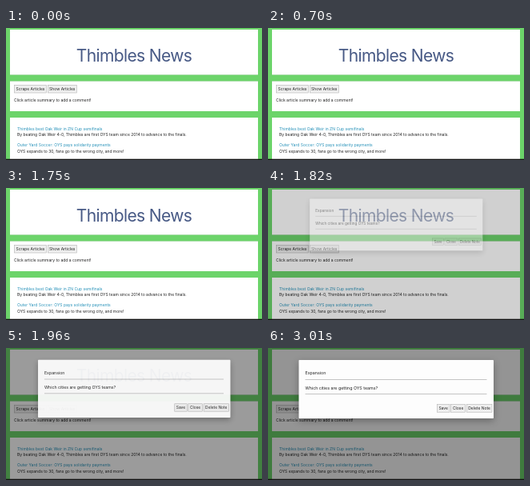
Animation of 320 by 165 pixels, one loop 3.5 s. Source, as an HTML page:

```html
<!DOCTYPE html>
<html lang="en">
<head>
<meta charset="utf-8">
<title>Thimbles News</title>
<style>
  html, body { margin: 0; width: 100%; height: 100%; overflow: hidden; background: #6cd46a; }
  svg { display: block; width: 100%; height: 100%; }
  text { font: 5px Inter, sans-serif; fill: #222; }
  .title { font-size: 21px; letter-spacing: -.03em; text-anchor: middle; fill: #475985; }
  .link { fill: #2590b8; }
  .panel { fill: #fff; filter: drop-shadow(0 .5px .5px rgba(0, 0, 0, .22)); }
  .button rect { fill: #efefef; stroke: #b4b4b4; stroke-width: .6; }
  .button text { text-anchor: middle; }
  .sheet { fill: #fdfdfd; filter: drop-shadow(0 3px 4px rgba(0, 0, 0, .3)); }
  .field { font-size: 5.3px; }
  .rule { stroke: #9e9e9e; stroke-width: .6; }
</style>
</head>
<body>
<svg viewBox="0 0 320 165" preserveAspectRatio="none">
  <rect width="320" height="165" fill="#6cd46a"/>
  <rect class="panel" x="5" y="2" width="310" height="56.5"/>
  <rect class="panel" x="5" y="66.5" width="310" height="37.5"/>
  <rect class="panel" x="5" y="112" width="310" height="60"/>

  <text class="title" x="160" y="41.5">Thimbles News</text>
  <g id="pageButtons"></g>
  <text x="10" y="92.3">Click article summary to add a comment!</text>

  <text class="link" x="14" y="128">Thimbles best Oak Weir in ZN Cup semifinals</text>
  <text x="14" y="135.4">By beating Oak Weir 4-0, Thimbles are first OYS team since 2014 to advance to the finals.</text>
  <text class="link" x="14" y="148">Outer Yard Soccer: OYS pays solidarity payments</text>
  <text x="14" y="155.5">OYS expands to 30, fans go to the wrong city, and more!</text>

  <rect id="overlay" width="320" height="165" opacity="0"/>
  <g id="modal" opacity="0">
    <rect class="sheet" x="38.5" y="15" width="243.5" height="73" rx=".8"/>
    <text class="field" x="46.5" y="33.3">Expansion</text>
    <path class="rule" d="M46.5 39.5H273.5M46.5 57.5H273.5"/>
    <text class="field" x="46.5" y="51.7">Which cities are getting OYS teams?</text>
    <g id="modalButtons"></g>
  </g>
  <rect y="163.7" width="320" height="1.3" fill="#111"/>
</svg>
<script>
  const LOOP = 3500, STEP = 70, OPEN_AT = 1750, OPEN_TIME = 280;
  const byId = id => document.getElementById(id);
  const overlay = byId('overlay'), modal = byId('modal');

  const button = (label, x, y, width) => `<g class="button">
    <rect x="${x}" y="${y}" width="${width}" height="9.6"/>
    <text x="${x + width / 2}" y="${y + 6.6}">${label}</text></g>`;

  byId('pageButtons').innerHTML =
    button('Scrape Articles', 10.4, 71.4, 40.2) + button('Show Articles', 52.3, 71.4, 36);
  byId('modalButtons').innerHTML =
    button('Save', 211.4, 70.6, 15.6) + button('Close', 228.6, 70.6, 18) + button('Delete Note', 248.2, 70.6, 31.8);

  function draw(now) {
    const time = Math.floor(now % LOOP / STEP) * STEP;
    const u = Math.min(1, Math.max(0, (time - OPEN_AT) / OPEN_TIME));
    const p = 1 - (1 - u) ** 2;
    const scale = 0.8 + 0.2 * p;
    overlay.setAttribute('opacity', 0.42 * p);
    modal.setAttribute('opacity', p);
    // The dialog grows about its centre while it slides down into place.
    modal.setAttribute('transform',
      `translate(160.2 ${51.5 - 9.9 * (1 - p)}) scale(${scale}) translate(-160.2 -51.5)`);
  }

  function tick() {
    draw(performance.now());
    requestAnimationFrame(tick);
  }
  tick();
</script>
</body>
</html>
```
